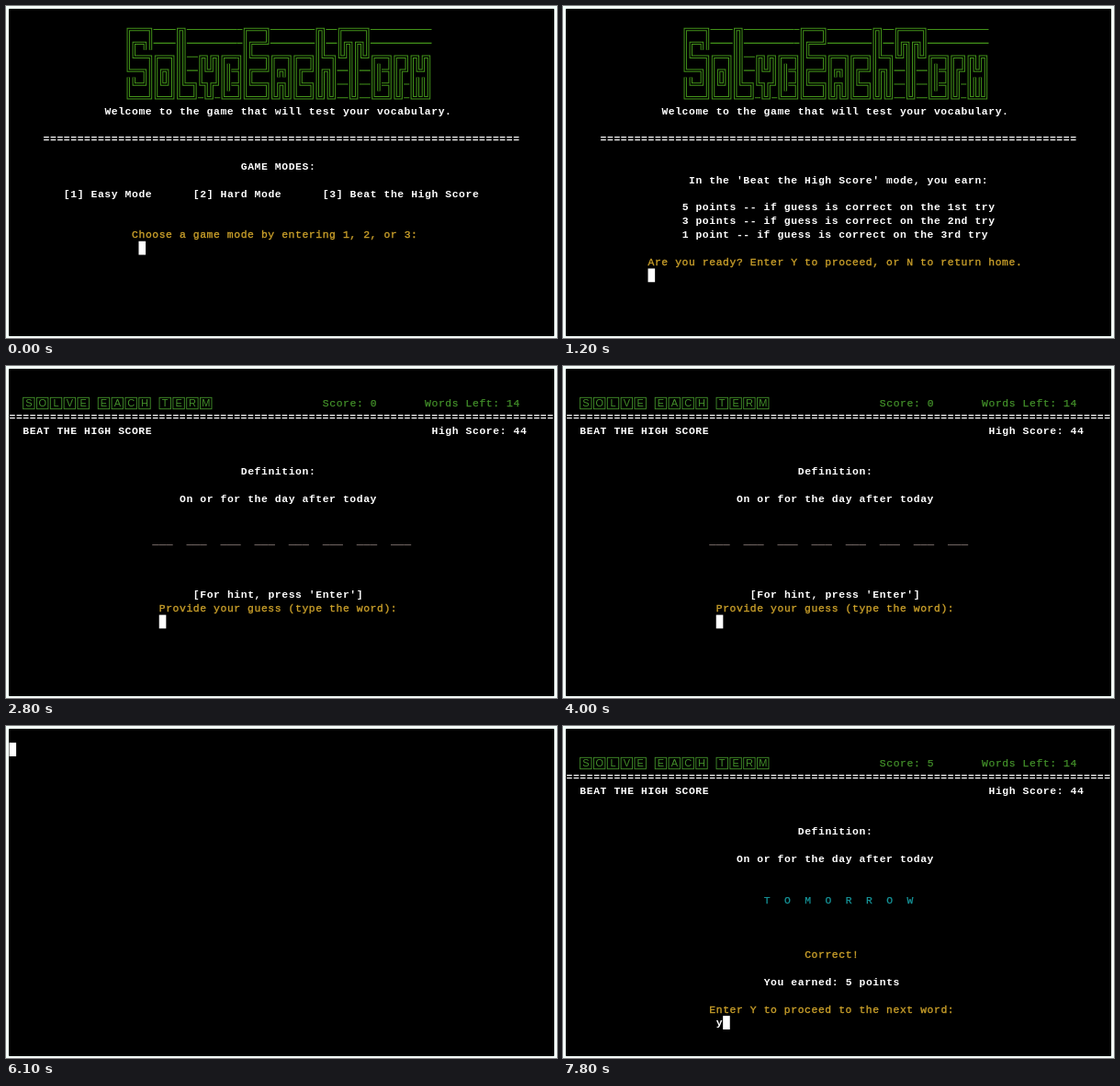
Animation of 600x361 px, one loop 8 s. Source, as an HTML page:

```html
<!DOCTYPE html>
<html lang="en">
<head>
<meta charset="utf-8">
<title>Word game in a terminal</title>
<style>
  html, body { margin: 0; width: 100%; height: 100%; overflow: hidden; background: #f4fffb; }
  svg { display: block; width: 100%; height: 100%; }
  text { font: 11.4px "Liberation Mono", monospace; letter-spacing: .579px; white-space: pre; }
  .white { fill: #fff; font-weight: bold; }
  .gold { fill: #c99f2a; stroke: #c99f2a; stroke-width: .35; }
  .green { fill: #43902a; stroke: #43902a; stroke-width: .25; }
  .teal { fill: #16979c; stroke: #16979c; stroke-width: .25; }
  .blank { fill: #b9a5a0; font-size: 12.37px; letter-spacing: 0; }
  .tile { fill: none; stroke: #43902a; stroke-width: .9; }
  .tileText { fill: #43902a; font: 11px "Liberation Sans", sans-serif; letter-spacing: 0; text-anchor: middle; }
</style>
</head>
<body>
<svg id="stage" viewBox="0 0 600 361" preserveAspectRatio="none">
  <rect x="3" y="3" width="594" height="356" rx="1"/>
  <g id="scenes"></g>
  <text id="typed" class="white"></text>
  <rect id="cursor" width="7.6" height="14.8" fill="#fff"/>
</svg>
<script>
const LOOP = 8000, CW = 7.42, RH = 14.85, LEFT = 3.5, TOP = 3.3;
const ART_LEFT = 130.2, ART_CW = 6.06;
const colX = c => LEFT + c * CW;
const rowY = r => TOP + r * RH;
const baseY = r => rowY(r) + 11.2;
const $ = id => document.getElementById(id);

const line = (row, col, str, cls = 'white') =>
  `<text class="${cls}" x="${colX(col)}" y="${baseY(row)}">${str}</text>`;

// Banner glyphs, six rows each; lowercase letters leave the top two rows as filler.
const GLYPHS = {
  S: '╔═══╗ ║╔═╗║ ║╚══╗ ╚══╗║ ║╚═╝║ ╚═══╝',
  E: '╔═══╗ ║╔══╝ ║╚══╗ ║╔══╝ ║╚══╗ ╚═══╝',
  T: '╔════╗ ║╔╗╔╗║ ╚╝║║╚╝ ──║║── ──║║── ──╚╝──',
  l: '╔╗── ║║── ║║── ║║── ║╚═╗ ╚══╝',
  h: '╔╗── ║║── ║╚═╗ ║╔╗║ ║║║║ ╚╝╚╝',
  o: '──── ──── ╔══╗ ║╔╗║ ║╚╝║ ╚══╝',
  v: '──── ──── ╔╗╔╗ ║╚╝║ ╚╗╔╝ ─╚╝─',
  e: '──── ──── ╔══╗ ║║═╣ ║║═╣ ╚══╝',
  a: '──── ──── ╔══╗ ║╔╗║ ║╔╗║ ╚╝╚╝',
  c: '──── ──── ╔══╗ ║╔═╝ ║╚═╗ ╚══╝',
  r: '─── ─── ╔═╗ ║╔╝ ║║─ ╚╝─',
  m: '──── ──── ╔╗╔╗ ║╚╝║ ║║║║ ╚╩╩╝'
};
// Strokes of each double-line character, as the cell sides they join.
const ARMS = {
  '═': ['LR'], '║': ['UD'], '╔': ['DR'], '╗': ['LD'], '╚': ['UR'], '╝': ['LU'],
  '╣': ['UD', 'LC'], '╩': ['LR', 'UC']
};
const SIDE = { L: [-.5, 0], R: [.5, 0], U: [0, -.5], D: [0, .5], C: [0, 0] };

function banner(title) {
  const letters = [...title].map(ch => GLYPHS[ch].split(' '));
  let walls = '', filler = '';
  for (let r = 0; r < 6; r++) {
    [...letters.map(g => g[r]).join('')].forEach((ch, c) => {
      const x = ART_LEFT + (c + .5) * ART_CW, y = rowY(1.5 + r);
      const at = s => `${(x + SIDE[s][0] * ART_CW).toFixed(2)} ${(y + SIDE[s][1] * RH).toFixed(2)}`;
      if (ch === '─') filler += `M${at('L')}L${at('R')}`;
      else for (const [a, b] of ARMS[ch]) walls += `M${at(a)}L${at('C')}L${at(b)}`;
    });
  }
  return `<g fill="none" stroke="#43931a"><path d="${walls}" stroke-width="3.4"/>` +
    `<path d="${walls}" stroke="#000" stroke-width="1.4"/>` +
    `<path d="${filler}" stroke-width="1.1"/></g>`;
}

function tiles(words) {
  let col = 2, out = '';
  for (const ch of words) {
    if (ch !== ' ') {
      const x = colX(col) + .3, y = rowY(2) + 1.3;
      out += `<rect class="tile" x="${x}" y="${y}" width="12.4" height="12.4"/>` +
        `<text class="tileText" x="${x + 6.2}" y="${y + 10.1}">${ch}</text>`;
    }
    col += ch === ' ' ? 1 : 2;
  }
  return out;
}

const intro = banner('SolveEachTerm') +
  line(7, 14, 'Welcome to the game that will test your vocabulary.') +
  line(9, 5, '='.repeat(70));

const board = score => tiles('SOLVE EACH TERM') +
  line(2, 46, 'Score: ' + score, 'green') + line(2, 61, 'Words Left: 14', 'green') +
  line(3, 0, '='.repeat(80)) +
  line(4, 2, 'BEAT THE HIGH SCORE') + line(4, 62, 'High Score: 44') +
  line(7, 34, 'Definition:') + line(9, 25, 'On or for the day after today');

const menu = intro + line(11, 34, 'GAME MODES:') +
  line(13, 8, '[1] Easy Mode') + line(13, 27, '[2] Hard Mode') +
  line(13, 46, '[3] Beat the High Score') +
  line(16, 18, 'Choose a game mode by entering 1, 2, or 3:', 'gold');

const rules = intro + line(12, 18, "In the 'Beat the High Score' mode, you earn:") +
  line(14, 17, '5 points -- if guess is correct on the 1st try') +
  line(15, 17, '3 points -- if guess is correct on the 2nd try') +
  line(16, 17, '1 point -- if guess is correct on the 3rd try') +
  line(18, 12, 'Are you ready? Enter Y to proceed, or N to return home.', 'gold');

const play = board(0) + line(12, 21, '___  '.repeat(8), 'blank') +
  line(16, 27, "[For hint, press 'Enter']") +
  line(17, 22, 'Provide your guess (type the word):', 'gold');

const result = board(5) + line(12, 29, [...'TOMORROW'].join('  '), 'teal') +
  line(16, 35, 'Correct!', 'gold') + line(18, 29, 'You earned: 5 points') +
  line(20, 21, 'Enter Y to proceed to the next word:', 'gold');

// Each scene: start time, markup, input row and column, typed text and key times.
const SCENES = [
  { at: 0, art: menu, row: 17, col: 19, word: '3', keys: [600] },
  { at: 1100, art: '', row: 1, col: 0, word: '', keys: [] },
  { at: 1200, art: rules, row: 19, col: 12, word: 'y', keys: [2200] },
  { at: 2700, art: play, row: 18, col: 22, word: 'tomorrow',
    keys: [4400, 4600, 4800, 5000, 5100, 5200, 5300, 5500] },
  { at: 6100, art: '', row: 1, col: 0, word: '', keys: [] },
  { at: 6200, art: result, row: 21, col: 22, word: 'y', keys: [7700] }
];

$('scenes').innerHTML = SCENES.map(s => `<g display="none">${s.art}</g>`).join('');
const groups = [...$('scenes').children];
const typed = $('typed'), cursor = $('cursor');

function render(t) {
  const now = SCENES.filter(s => s.at <= t).pop();
  const count = now.keys.filter(k => k <= t).length;
  groups.forEach((g, i) => g.setAttribute('display', SCENES[i] === now ? 'inline' : 'none'));
  typed.textContent = now.word.slice(0, count);
  typed.setAttribute('x', colX(now.col));
  typed.setAttribute('y', baseY(now.row));
  cursor.setAttribute('x', colX(now.col + count));
  cursor.setAttribute('y', rowY(now.row));
}

const start = performance.now();
function tick() {
  render((performance.now() - start) % LOOP);
  requestAnimationFrame(tick);
}
tick();
</script>
</body>
</html>
```
